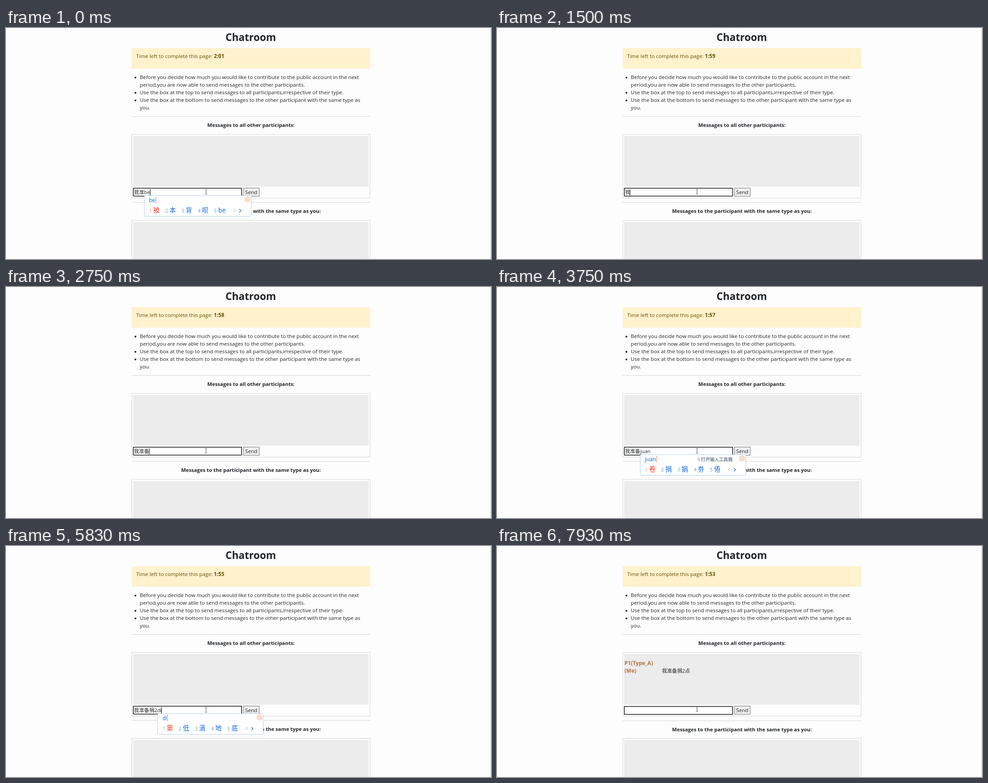
Recreate the animation shown at these times as an HTML page. Size 1085 by 516 pixels, loop 8 s.

```html
<!DOCTYPE html>
<html lang="zh-CN">
<head>
<meta charset="utf-8">
<title>Chatroom</title>
<style>
  html, body { margin: 0; width: 100%; height: 100%; overflow: hidden; background: #fdfdfd; }
  svg { display: block; width: 100%; height: 100%; }
  text { font: 11.66px "Open Sans", "Noto Sans CJK SC", "Noto Sans", sans-serif; fill: #212529; white-space: pre; }
  .title { font-size: 22.7px; font-weight: 700; text-anchor: middle; }
  .heading { font-size: 11.37px; font-weight: 700; text-anchor: middle; }
  .alert { fill: #664d03; }
  .alert tspan { font-weight: 700; }
  .sender { font-size: 12px; font-weight: 700; fill: #b97439; }
  .typed { font-size: 11.3px; }
  .rule { stroke: #d3d3d3; }
  .panel { fill: none; stroke: #d6d6d6; }
  .log { fill: #ececec; }
  .pinyin { font-size: 12px; font-weight: 500; fill: #0a66d8; }
  .words { font-size: 14.3px; fill: #0f6ad8; }
  .words .digit { font-size: 10.5px; fill: #5b9ae0; }
  .words .first { fill: #f5391f; }
  .words .digit.first { fill: #f58a62; }
  .tool { font-size: 10.1px; fill: #33485f; text-anchor: end; }
  .arrow { fill: none; stroke-width: 1.4; }
</style>
</head>
<body>
<svg viewBox="0 0 1085 516">
  <path d="M1084.5 0V516" stroke="#cfcfcf"/>
  <text class="title" x="547.5" y="29">Chatroom</text>

  <rect x="281" y="45" width="534" height="46" rx="3" fill="#fff2cd"/>
  <text class="alert" x="291.3" y="67">Time left to complete this page: <tspan id="clock"></tspan></text>

  <g id="rules"></g>
  <path class="rule" d="M281 197.5H815"/>

  <text class="heading" x="548" y="221">Messages to all other participants:</text>
  <rect class="panel" x="281.5" y="237.5" width="533" height="142.5"/>
  <rect class="log" x="284.5" y="241.5" width="527" height="113"/>
  <g id="message">
    <text class="sender" x="285" y="266">P1(Type_A)</text>
    <text class="sender" x="285" y="283">(Me)</text>
    <text class="typed" x="369" y="283">我准备捐2点</text>
  </g>

  <g id="field">
    <rect x="284.75" y="357.75" width="242.5" height="17.75" rx="1" fill="#fff" stroke="#101010" stroke-width="1.5"/>
    <text class="typed" id="typed" x="286.5" y="371"></text>
    <rect id="caret" y="360" width="1" height="14"/>
  </g>
  <rect x="531.5" y="357.5" width="35" height="18.5" fill="#efefef" stroke="#6f6f6f"/>
  <text x="535" y="371">Send</text>

  <g id="lower">
    <path class="rule" d="M281 389.5H815"/>
    <text class="heading" x="548" y="413">Messages to the participant with the same type as you:</text>
  </g>
  <rect class="panel" x="281.5" y="429.5" width="533" height="143"/>
  <rect class="log" x="284.5" y="433.5" width="527" height="113"/>

  <path id="mouse" d="M445 360.5H446.5L447.5 361.5L448.5 360.5H450M447.5 361V371M445 371.5H446.5L447.5 370.5L448.5 371.5H450" fill="none" stroke="#333" stroke-width=".9"/>

  <g id="popup">
    <rect id="frame" x="-.5" y="374.5" height="46" rx="2" fill="#fff" stroke="#b5d0ea"/>
    <text class="pinyin" id="pinyin" x="10" y="389"></text>
    <rect id="pinyinCaret" y="377" width="1" height="15" fill="#f0705a"/>
    <text class="words" id="words" x="10" y="411.5"></text>
    <g id="corner">
      <circle cx="-9" cy="383" r="7" fill="#fadccf"/>
      <text class="tool" id="tool" x="-30" y="388.5"><tspan fill="#6f8296">9</tspan> 打开输入工具箱</text>
      <path class="arrow" d="M-36 405L-39 408L-36 411" stroke="#c4cdd6"/>
      <path class="arrow" d="M-27 404.5L-23.5 408L-27 411.5" stroke="#1470d8"/>
    </g>
  </g>
</svg>
<script>
const LOOP = 8000, SENT = 6690, COMMIT = 6410;
const TICKS = [410, 1370, 2330, 3330, 4300, 5280, 6280, 7220];

// time, committed text, pinyin, popup left, popup width, candidates
const KEYS = [
  [0, '我准', 'be', 310, 239, '被 本 背 呗 be'],
  [130, '我准', 'bei', 310, 261, '被 备 背 北 被子里'],
  [1100, '我准', 'be', 310, 239, '被 本 背 呗 be'],
  [1240, '我准', 'b', 310, 236, '不 吧 把 被 比'],
  [1370, '我准'],
  [1500, '我'],
  [1650, '我', 'z', 299, 236, '在 这 中 做 最'],
  [1790, '我', 'zh', 299, 385, '这 账号 中华人民共和国 这会儿 最后'],
  [1920, '我', 'zhu', 299, 236, '主 住 著 祝 猪'],
  [2050, '我', "zhu'b", 299, 307, '逐步 主编 主板 铸币 主播'],
  [2200, '我', "zhu'be", 299, 319, '准备 主备 主编 储备 逐步'],
  [2330, '我', "zhu'bei", 299, 319, '准备 主备 储备 筑北 珠贝'],
  [2750, '我准备'],
  [2900, '我准备', 'j', 321, 236, '就 将 及 叫 级'],
  [3050, '我准备', 'ju', 321, 236, '就 句 据 局 举'],
  [3190, '我准备', 'juan', 321, 236, '卷 捐 娟 劵 倦'],
  [4300, '我准备捐'],
  [5140, '我准备捐2'],
  [5700, '我准备捐2', 'd', 340, 236, '的 都 到 大 点'],
  [5830, '我准备捐2', 'di', 340, 236, '第 低 滴 地 底'],
  [5970, '我准备捐2', 'dian', 340, 225, '点 电 店 典 垫'],
  [COMMIT, '我准备捐2点'],
  [SENT, ''],
];

const RULES = [
  '•Before you decide how much you would like to contribute to the public account in the next',
  'period,you are now able to send messages to the other participants.',
  '•Use the box at the top to send messages to all participants,irrespective of their type.',
  '•Use the box at the bottom to send messages to the other participant with the same type as',
  'you.',
];

const el = id => document.getElementById(id);
const show = (id, on) => el(id).style.display = on ? '' : 'none';
const move = (id, x, y) => el(id).setAttribute('transform', `translate(${x} ${y})`);
const width = id => el(id).textContent ? el(id).getComputedTextLength() : 0;

el('rules').innerHTML = RULES.map((line, i) => {
  const y = 114 + 17 * i;
  const dot = line[0] === '•' ? `<circle cx="289.5" cy="${y - 3.2}" r="2.1" fill="#212529"/>` : '';
  return `${dot}<text x="299.3" y="${y}">${line.replace('•', '')}</text>`;
}).join('');

function drawPopup(pinyin, left, boxWidth, candidates) {
  move('popup', left, 0);
  el('frame').setAttribute('width', boxWidth);
  el('pinyin').textContent = pinyin;
  el('pinyinCaret').setAttribute('x', Math.floor(11 + width('pinyin')));
  el('words').innerHTML = candidates.split(' ').map((word, i) => {
    const first = i ? '' : 'first';
    return `<tspan class="digit ${first}" dx="${i ? 12.6 : 0}">${i + 1}</tspan>` +
           `<tspan class="${first}" dx="3.4">${word}</tspan>`;
  }).join('');
  move('corner', boxWidth, 0);
}

function drawKey([, text, pinyin, ...popup]) {
  el('typed').textContent = text + (pinyin || '').replace("'", '');
  el('caret').setAttribute('x', Math.floor(286.5 + width('typed')));
  show('popup', pinyin);
  if (pinyin) drawPopup(pinyin, ...popup);
}

let current;
function render(t) {
  const key = KEYS.findLast(k => k[0] <= t);
  if (key !== current) drawKey(current = key);

  const sent = t >= SENT;
  const idle = t - (sent ? COMMIT : key[0]);
  show('caret', idle < 550 || (idle >= 1090 && idle < 1520));
  show('tool', idle >= 420);
  show('message', sent);
  move('field', 0, sent ? 0.75 : 0);
  move('lower', 0, sent ? 0.75 : 0);
  move('mouse', 0, t < 7500 ? 0 : t < 7640 ? -1 : -2);

  const left = 121 - TICKS.filter(tick => tick <= t).length;
  el('clock').textContent = `${Math.floor(left / 60)}:${String(left % 60).padStart(2, '0')}`;
}

const start = performance.now();
function loop() {
  render((performance.now() - start) % LOOP);
  requestAnimationFrame(loop);
}
loop();
</script>
</body>
</html>
```
